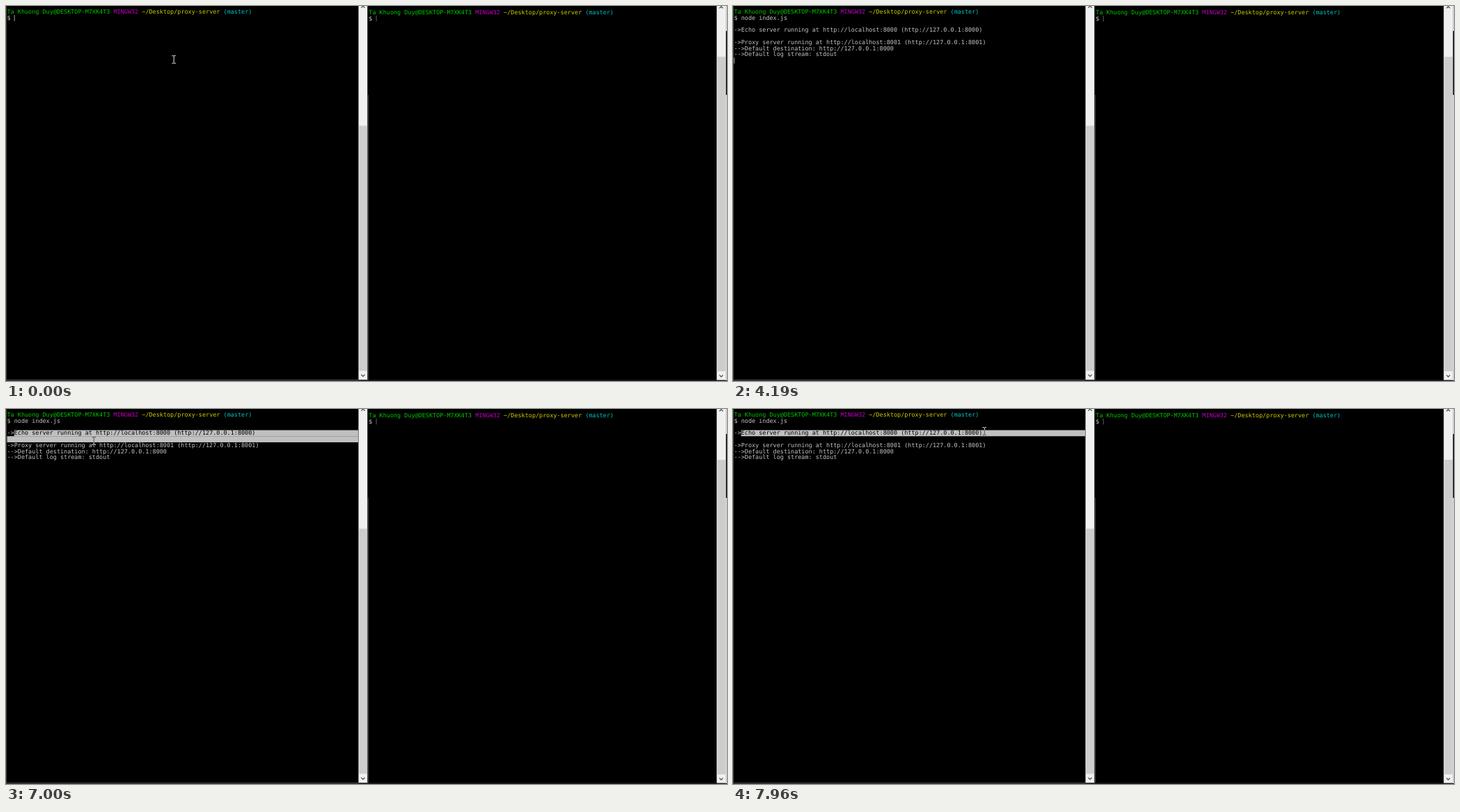
Recreate the animation shown at these times as an HTML page. Size 1036 px wide and 540 px high, loop 8 s.

```html
<!DOCTYPE html>
<html lang="en">
<head>
<meta charset="utf-8">
<title>Proxy server terminals</title>
<style>
  html, body { margin: 0; width: 100%; height: 100%; overflow: hidden; background: #000; }
  svg { display: block; width: 1036px; height: 540px; }
  text { font: 8.48px "DejaVu Sans Mono", monospace; fill: #c4c4c4; white-space: pre; text-rendering: geometricPrecision; }
  .g { fill: #00c800; } .m { fill: #bf00bf; } .y { fill: #cdcd00; } .c { fill: #00c5c5; } .k { fill: #000; }
  #mouse { mix-blend-mode: difference; fill: none; stroke: #fff; stroke-width: .9; }
</style>
</head>
<body>
<svg id="stage" viewBox="0 0 1036 540">
  <rect width="1036" height="540"/>
  <g id="frame"></g>
  <g id="sel" fill="#c0c0c0"></g>
  <g id="left"></g>
  <g id="right"></g>
  <rect id="caret" width=".8" height="8.6" fill="#d0d0d0"/>
  <path id="mouse" d="M-2.7-5.4H-.6L0-4.8L.6-5.4H2.7M0-4.8V4.8M-2.7 5.4H-.6L0 4.8L.6 5.4H2.7"/>
</svg>
<script>
const $ = id => document.getElementById(id);
const LOOP = 8000, X0 = 1.5, CW = 5.105, TOP = 4.2, LH = 8.75, EDGE = 506;
const colX = c => X0 + c * CW;
const rowY = r => TOP + r * LH;

const rect = (x, y, w, h, fill) =>
  `<rect x="${x}" y="${y}" width="${w}" height="${h}"${fill ? ` fill="${fill}"` : ''}/>`;
const line = (row, body, x = X0, dy = 0) =>
  `<text x="${x}" y="${rowY(row) + 6.8 + dy}">${body}</text>`;
const span = (cls, s) => `<tspan class="${cls}">${s}</tspan>`;

const PROMPT = span('g', 'Ta Khuong Duy@DESKTOP-M7XK4T3') + ' ' + span('m', 'MINGW32') + ' ' +
  span('y', '~/Desktop/proxy-server') + ' ' + span('c', '(master)');
const ECHO = '->Echo server running at http://localhost:8000 (http://127.0.0.1:8000)';
const OUTPUT = [
  '->Proxy server running at http://localhost:8001 (http://127.0.0.1:8001)',
  '-->Default destination: http://127.0.0.1:8000',
  '-->Default log stream: stdout'
];

// Up and down keys walk through the shell history.
const HISTORY = ['clear', 'node index.js'];
const KEYS = [1430, 2050, 2300, 2800];
const RUN = 3570, PRINT = 4190, WAKE = 5060, DRAG = 6640;
const STEP = 120, BLINK = 500, PHASE = -300;

// Pointer path as time, x, y.
const PATH = [[WAKE, 319, 140], [5420, 150, 62], [5780, 17.5, 34], [6520, 16.5, 34],
  [7000, 126.3, 46], [7360, 316.3, 32], [7600, 368, 26], [7720, 364, 31], [7960, 361.3, 32]];

function pointer(t) {
  if (t < KEYS[0]) return [241.2, 77];
  if (t < WAKE) return null;
  const s = Math.floor((t - 40) / STEP) * STEP + 40;
  const i = Math.max(1, PATH.findIndex(p => p[0] >= s));
  const [a, b] = [PATH[i - 1], PATH[i]];
  const u = Math.max(0, (s - a[0]) / (b[0] - a[0]));
  return [a[1] + (b[1] - a[1]) * u, a[2] + (b[2] - a[2]) * u];
}

function caretOn(t) {
  if (t >= RUN && t < PRINT) return true;
  const reset = [PHASE, ...KEYS, PRINT].filter(k => k <= t).pop();
  return (t - reset) % (2 * BLINK) < BLINK;
}

function scrollbar(x, thumb, end, arrowTop) {
  const mid = x + 6.5;
  const chevron = (y, d) =>
    `<path d="M${mid - 2.6} ${y - d}L${mid} ${y + d}L${mid + 2.6} ${y - d}" fill="none" stroke="#505050" stroke-width="1.3"/>`;
  return rect(x, 0, 12.8, end, '#f0f0f0') + rect(x + 1, thumb, 11.6, end - 12.6 - thumb, '#cdcdcd') +
    chevron(arrowTop, -1.3) + chevron(end - 5.9, 1.3);
}

function drawFrame() {
  $('frame').innerHTML = rect(0, 0, .8, 539, '#555') + rect(520, 128, .8, 410, '#555') +
    rect(0, 538.4, 520, .9, '#777') + rect(520, 538.6, 516, .9, '#383838') +
    scrollbar(506.5, 172.4, 538, 1.3) + scrollbar(1021.2, 73.2, 538.6, 2) +
    rect(1034, 0, 2, 539, '#d0d0d0') + rect(1034.6, 36, 1.4, 92, '#000');
  $('right').innerHTML = line(0, PROMPT, 521.3, .9) + line(1, '$', 521.3, .9) +
    rect(531.7, 13.7, .8, 8.6, '#777');
}

// Selected spans as [row, first column, last column or null for the full row].
function selection(x, y) {
  const row = Math.floor((y - TOP) / LH);
  const col = Math.floor((x - X0) / CW) - 1;
  if (row > 3) return [[3, 2, null], [4, 0, null]];
  if (row < 3) return [[2, col, null], [3, 0, 2]];
  return [[3, 2, col >= ECHO.length - 1 ? null : col]];
}

function render(t) {
  const presses = KEYS.filter(k => k <= t).length;
  const command = presses ? HISTORY[(presses - 1) % 2] : '';
  const spot = pointer(t);
  const spans = t >= DRAG ? selection(...spot) : [];

  $('sel').innerHTML = spans.map(([r, a, b]) =>
    rect(colX(a), rowY(r), (b === null ? EDGE : colX(b)) - colX(a), LH)).join('');

  let text = line(0, PROMPT) + line(1, '$ ' + command);
  if (t >= PRINT) {
    const [, a, end] = spans.find(s => s[0] === 3) || [3, 0, 0];
    const b = end === null ? ECHO.length : end;
    text += line(3, ECHO.slice(0, a) + span('k', ECHO.slice(a, b)) + ECHO.slice(b));
    text += OUTPUT.map((s, i) => line(5 + i, s)).join('');
  }
  $('left').innerHTML = text;

  const row = t < RUN ? 1 : t < PRINT ? 2 : 8;
  const caret = $('caret');
  caret.setAttribute('x', colX(row === 1 ? 2 + command.length : 0));
  caret.setAttribute('y', rowY(row) + .1);
  caret.setAttribute('visibility', caretOn(t) ? 'visible' : 'hidden');

  const mouse = $('mouse');
  mouse.setAttribute('visibility', spot ? 'visible' : 'hidden');
  if (spot) mouse.setAttribute('transform', `translate(${spot})`);
}

drawFrame();
const start = performance.now();
function tick() {
  render((performance.now() - start) % LOOP);
  requestAnimationFrame(tick);
}
tick();
</script>
</body>
</html>
```
